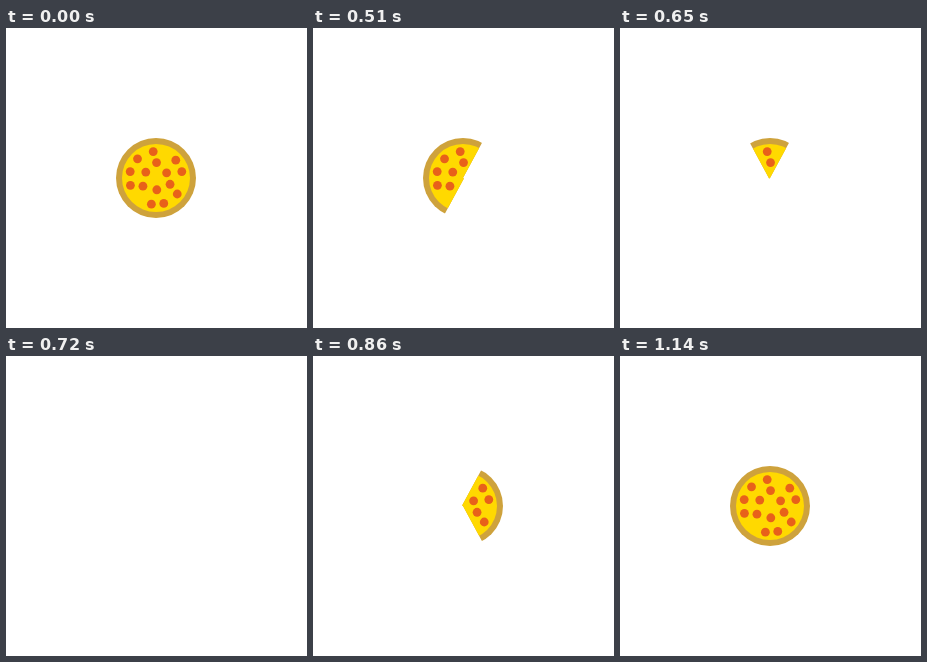
Animation of 301x300 px, one loop 1.17 s. Source, as an HTML page with a canvas:

```html
<!DOCTYPE html>
<html>
<head>
<meta charset="utf-8">
<title>Pizza loader</title>
<style>
html, body { margin: 0; width: 100%; height: 100%; overflow: hidden; background: #fff; }
canvas { display: block; }
</style>
</head>
<body>
<canvas id="stage" width="301" height="300"></canvas>
<script>
const ctx = document.getElementById('stage').getContext('2d');
const LOOP = 1170, HOLD = 370, STEP = 70, SLICES = 6;
const C = 150, REACH = 60;
const rimAngles = [37, 73, 100, 164, 194, 226, 264, 318, 346];

function disc(x, y, r, color) {
  ctx.fillStyle = color;
  ctx.beginPath();
  ctx.arc(x, y, r, 0, 2 * Math.PI);
  ctx.fill();
}

function topping(degrees, r) {
  const a = degrees * Math.PI / 180;
  disc(C + r * Math.cos(a), C + r * Math.sin(a), 4.4, '#e8611a');
}

// Sixths of a turn, clockwise from the upper right, stretched a little vertically
function cutAngle(i) {
  const a = (i - 1) * Math.PI / 3;
  return Math.atan2(1.07 * Math.sin(a), Math.cos(a));
}

// The leading cut sits one pixel outside the centre line
function clipSlices(first, last) {
  const a = cutAngle(first), cos = Math.cos(a), sin = Math.sin(a);
  ctx.beginPath();
  ctx.moveTo(C, C);
  ctx.lineTo(C + sin, C - cos);
  ctx.lineTo(C + sin + REACH * cos, C - cos + REACH * sin);
  ctx.arc(C, C, REACH, a, cutAngle(last));
  ctx.closePath();
  ctx.clip();
}

function pizza(first, last) {
  if (first === last) return;
  ctx.save();
  if (last - first < SLICES) clipSlices(first, last);
  disc(C, C, 40, '#cea23c');
  disc(C, C, 34, '#ffd900');
  for (const angle of rimAngles) topping(angle, 26.6);
  for (let i = 0; i < 6; i++) topping(24 + 62 * i, i % 2 ? 11.8 : 15.4);
  ctx.restore();
}

function draw(now) {
  const t = now % LOOP;
  const step = t < HOLD ? 0 : Math.floor((t - HOLD) / STEP) + 1;
  ctx.clearRect(0, 0, 301, 300);
  // Slices are eaten one by one, then served again in the same order
  if (step <= SLICES) pizza(step, SLICES);
  else pizza(0, step - SLICES);
  requestAnimationFrame(draw);
}
requestAnimationFrame(draw);
</script>
</body>
</html>
```
